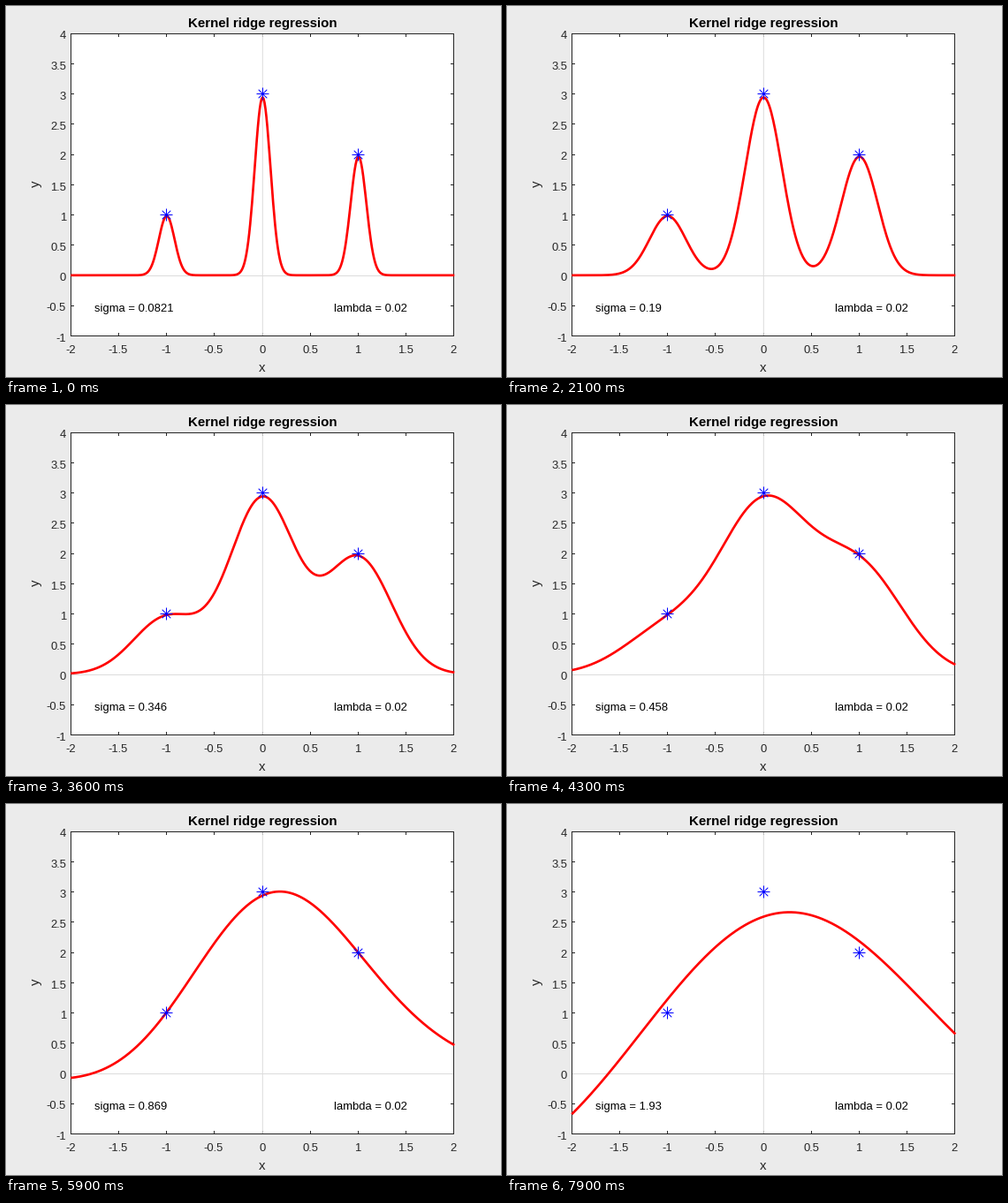
Recreate the animation shown at these times as a matplotlib script. Size 560 by 420 pixels, loop 8 s.

```python
import numpy as np
import matplotlib.pyplot as plt
from matplotlib.animation import FuncAnimation

plt.rcParams["font.family"] = "Liberation Sans"

W, H, DPI = 560, 420, 100
PT = 72 / DPI  # points per pixel
FRAMES, STEP = 80, 100
LAMBDA = 0.02
INK, PALE = "#262626", "#dcdcdc"
LEFT, RIGHT, TOP, BOTTOM = 73.5, 506.5, 31.5, 373.5  # pixel centres of the box
TICK = 3.5

px = np.array([-1.0, 0.0, 1.0])
py = np.array([1.0, 3.0, 2.0])
grid = np.linspace(-2, 2, 401)


def sx(x):
    return 73.3 + (x + 2) * 108.5


def sy(y):
    return 31.0 + (4 - y) * 68.46


def column(x):
    """Centre of the pixel column for a data x."""
    return np.round(73 + (x + 2) / 4 * (RIGHT - LEFT)) + 0.5


def row(y):
    """Centre of the pixel row for a data y."""
    return np.floor(sy(y) + 0.3) + 0.5


def kernel(a, b, sigma):
    return np.exp(-(a[:, None] - b[None, :]) ** 2 / (2 * sigma ** 2))


def ridge_fit(sigma):
    weights = np.linalg.solve(kernel(px, px, sigma) + LAMBDA * np.eye(3), py)
    return kernel(grid, px, sigma) @ weights


def sigma_at(i):
    return np.exp(-2.5 + 0.04 * i)


fig = plt.figure(figsize=(W / DPI, H / DPI), dpi=DPI, facecolor="#ebebeb")
ax = fig.add_axes([0, 0, 1, 1])
ax.set_xlim(0, W)
ax.set_ylim(H, 0)
ax.axis("off")


def line(xs, ys, color, z, width=1.0, cap="butt"):
    return ax.plot(xs, ys, color=color, lw=width * PT, zorder=z, snap=False,
                   solid_capstyle=cap, solid_joinstyle="round",
                   clip_on=False)[0]


def label(x, y, s, size=13, color=INK, ha="center", **kw):
    return ax.text(x, y, s, fontsize=size * PT, color=color, ha=ha,
                   va="baseline", **kw)


# Plot box and ticks
ax.fill([LEFT, RIGHT, RIGHT, LEFT], [TOP, TOP, BOTTOM, BOTTOM],
        color="white", lw=0, zorder=0)
line([LEFT, RIGHT, RIGHT, LEFT, LEFT], [TOP, TOP, BOTTOM, BOTTOM, TOP],
     INK, 3, cap="projecting")

for v in np.arange(-2, 2.1, 0.5):
    x = column(v)
    line([x, x], [TOP, TOP + TICK], INK, 1)
    line([x, x], [BOTTOM - TICK, BOTTOM], INK, 1)
    label(x - 0.5, 393, f"{v:g}")

for v in np.arange(-1, 4.1, 0.5):
    y = row(v)
    line([LEFT, LEFT + TICK], [y, y], INK, 1)
    line([RIGHT - TICK, RIGHT], [y, y], INK, 1)
    label(68, np.floor(sy(v) + 0.9) + 6, f"{v:g}", ha="right")

# Zero lines
line([LEFT, RIGHT], [row(0), row(0)], PALE, 2)
line([sx(0), sx(0)], [TOP, BOTTOM], PALE, 2)

label(290, 24, "Kernel ridge regression", 15, "black", weight="bold")
label(290, 414, "x", 15)
label(38, 201, "y", 15, rotation=90, rotation_mode="anchor")
label(sx(0.75) - 0.5, 346, f"lambda = {LAMBDA:g}", color="black", ha="left")
sigma_text = label(sx(-1.75) - 0.5, 346, "", color="black", ha="left")

curve = line([], [], "red", 4, 2.67)

# Star markers with shorter diagonals
for x, y in zip(px, py):
    cx, cy = column(x), row(y)
    for dx, dy in [(7, 0), (0, 7), (4.8, 4.8), (4.8, -4.8)]:
        line([cx - dx, cx + dx], [cy - dy, cy + dy], "blue", 5)


def update(i):
    sigma = sigma_at(i)
    curve.set_data(sx(grid), sy(ridge_fit(sigma)))
    sigma_text.set_text(f"sigma = {sigma:.3g}")
    return curve, sigma_text


anim = FuncAnimation(fig, update, frames=FRAMES, interval=STEP,
                     repeat=True, repeat_delay=0, init_func=lambda: update(0))
plt.show()
```
